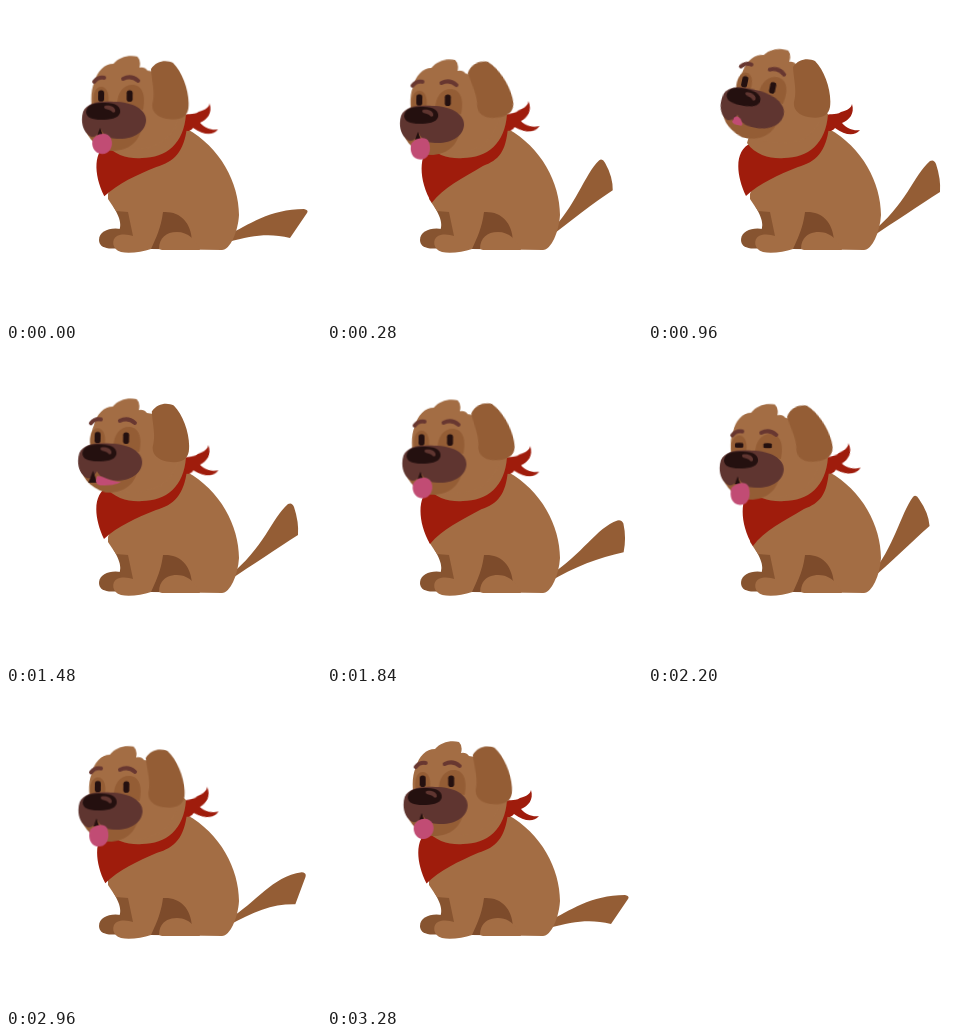
An HTML page that plays this animation: 315 by 315 pixels, repeating every 3.32 s.

```html
<!DOCTYPE html>
<html lang="en">
<head>
<meta charset="utf-8">
<title>Sitting dog</title>
<style>
html, body { margin: 0; width: 100%; height: 100%; overflow: hidden; background: #fff; }
svg { display: block; width: 100vw; height: 100vh; }

.coat { fill: #a36d44; }
.dark { fill: #945d35; }
.far { fill: #875430; }
.shade { fill: #7d4b2b; }
.red { fill: #9f1c0c; }
.ink { fill: #24100f; }
.muzzle { fill: #5f3530; }
.pink { fill: #c14c74; }
.brow { fill: none; stroke: #683730; stroke-width: 4; stroke-linecap: round; }

/* Wagging and panting share one beat of 455 ms, paused while the dog looks up.
   The head leads the tail; scarf and ear trail behind it. */
:root { --lead: -45ms; --trail: -3288ms; }
.move { animation: 3320ms cubic-bezier(.37, 0, .63, 1) infinite; }
#tail { animation-name: wag; }
#skull { animation-name: skull; animation-delay: var(--lead); transform-origin: 140px 130px; }
#ear { animation-name: nod, flap; animation-delay: var(--lead), var(--trail); transform-origin: 152px 62px; }
#face { animation-name: face; animation-delay: var(--lead); transform-origin: 102.5px 98px; }
#tongue { animation-name: tongue; animation-delay: var(--lead); }
#mouth { animation-name: mouth; animation-delay: var(--lead); transform-origin: 94px 125px; }
#scarf { animation-name: scarf; animation-delay: var(--trail); }
#knot { animation-name: knot; animation-delay: var(--lead); transform-origin: 180px 117px; }
#brows { animation-name: brows; }
.eye { animation-name: blink; transform-box: fill-box; transform-origin: 50% 60%; }

@keyframes wag {
  0%, 12.7%, 58.9%, 72.6%, 86.3%, 100% {
    d: path("M222 229 C242 219 264 203 298 203 Q303 204 301 207 L284 232 C264 227 247 229 222 236 Z");
    animation-timing-function: cubic-bezier(.12, 0, .39, 0);
  }
  3.4%, 62.3%, 76%, 89.7% {
    d: path("M222 227 C254 207 266 179 295 173 Q300 173 299 178 L291 206 C267 207 249 216 222 233 Z");
    animation-timing-function: cubic-bezier(.61, 1, .88, 1);
  }
  6.85%, 52%, 65.7%, 79.4%, 93.1% {
    d: path("M222 227 C246 198 252 164 264 147 Q267 144 270 149 Q280 163 281 176 C262 193 246 211 222 231 Z");
    animation-timing-function: cubic-bezier(.12, 0, .39, 0);
  }
  10.1%, 55.5%, 69.1%, 82.8%, 96.5% {
    d: path("M222 227 C256 205 270 179 291 172 Q295 171 297 175 Q300 189 297 204 C272 209 248 218 222 233 Z");
    animation-timing-function: cubic-bezier(.61, 1, .88, 1);
  }
  15.66% { d: path("M222 226 C254 199 266 164 286 158 Q290 157 291 162 L289 192 C268 200 249 211 222 233 Z"); }
  22%, 46% { d: path("M222 228 C259 198 265 170 282 155 Q286 153 288 158 Q293 173 292 186 C270 200 248 215 222 232 Z"); }
}
@keyframes skull {
  0%, 13.7%, 58.9%, 72.6%, 86.3%, 100% { transform: translate(0, -1px); }
  6.85%, 52%, 65.7%, 79.4%, 93.1% { transform: translate(-1.3px, 5px) rotate(-3.7deg); }
  17% { transform: translate(0, -1.5px); }
  26%, 33% { transform: translate(0, -6px) rotate(6deg); }
  43.5%, 46% { transform: translate(0, -1px) rotate(-1deg); }
}
@keyframes nod {
  0%, 13.7%, 46%, 58.9%, 72.6%, 86.3%, 100% { translate: .8px -.5px; }
  6.85%, 52%, 65.7%, 79.4%, 93.1% { translate: -8px 4px; }
  26%, 33% { translate: 0 -2px; }
}
@keyframes flap {
  0%, 13.7%, 46%, 58.9%, 72.6%, 86.3%, 100% { rotate: 0deg; }
  6.85%, 52%, 65.7%, 79.4%, 93.1% { rotate: -14deg; }
}
@keyframes face {
  0%, 13.7%, 58.9%, 72.6%, 86.3%, 100% { transform: translate(.7px, -1px); }
  6.85%, 52%, 65.7%, 79.4%, 93.1% { transform: translate(-5px, 7px) rotate(1deg); }
  17% { transform: translate(.5px, -1.5px); }
  26%, 33% { transform: translate(0, -13px) rotate(12deg); }
  43.5%, 46% { transform: translate(-3.5px, -1.5px) rotate(1deg); }
}
@keyframes tongue {
  0%, 13.7%, 58.9%, 72.6%, 86.3%, 100% { d: path("M90 130 C96 126 103 128 105 133 C108 140 103 148 96 148 C88 148 84 139 87 133 Z"); }
  6.85%, 52%, 65.7%, 79.4%, 93.1% { d: path("M90 132 C97 127 104 128 105 132 C108 141 106 151 97 151 C89 151 86 143 88 134 Z"); }
  17% { d: path("M93 127 C97 126 101 129 103 134 C107 142 102 148 95 148 C87 148 84 140 88 134 Z"); }
  25%, 33% { d: path("M92 127 C95 124 99 127 101 131 C102 134 101 134 98 134 C95 134 91 134 91 131 Z"); }
  43.5%, 47% { d: path("M95 129 C99 127 108 134 119 134 C115 137 107 138 100 138 C96 138 94 136 94 133 Z"); }
}
@keyframes mouth {
  0%, 17%, 52%, 100% { transform: none; }
  25%, 33% { transform: translate(-1px, 2px) scale(.7); }
  43.5%, 47% { transform: translate(-3px, 3px) scale(1.5); }
}
@keyframes scarf {
  0%, 13.7%, 46%, 58.9%, 72.6%, 86.3%, 100% { d: path("M103 137 C87 144 87 167 98 190 C112 177 130 169 150 161 C168 156 178 146 181 121 L174 106 Z"); }
  6.85%, 52%, 65.7%, 79.4%, 93.1% { d: path("M104 140 C92 147 91 174 105 197 C116 182 136 172 156 160 C172 154 179 146 181 121 L174 106 Z"); }
}
@keyframes knot {
  0%, 13.7%, 26%, 33%, 58.9%, 72.6%, 86.3%, 100% { transform: none; }
  17%, 46% { transform: rotate(-5deg); }
  6.85%, 52%, 65.7%, 79.4%, 93.1% { transform: rotate(-12deg); }
}
@keyframes brows {
  0%, 62%, 72%, 100% { transform: none; }
  65%, 68% { transform: translate(0, 5px); }
}
@keyframes blink {
  0%, 62%, 72%, 100% { transform: none; }
  65%, 68% { transform: scale(1.4, .45); }
}
</style>
</head>
<body>
<svg viewBox="0 0 315 315">
  <path id="tail" class="dark move" d="M222 229 C242 219 264 203 298 203 Q303 204 301 207 L284 232 C264 227 247 229 222 236 Z"/>

  <g id="body">
    <path class="far" d="M107 200 L124 204 L130 232 L108 234 C117 222 116 215 107 200 Z"/>
    <path class="far" d="M115 223 C104 221 93 225 93 234 C93 241 101 244 112 242 Z"/>
    <path class="coat" d="M102 188 C112 160 150 122 181 123 C214 141 233 177 233 209 C232 226 224 244 216 244 L145 243 C136 246 123 248 115 246 C106 244 105 233 111 230 C117 227 123 229 127 230 L122 206 L110 205 L102 193 Z"/>
    <path class="shade" d="M157 206 C174 205 185 216 186 235 L154 243 L145 243 C150 232 155 222 157 206 Z"/>
    <path class="coat" d="M153 243 C153 232 160 226 171 226 C182 226 190 234 194 244 L156 244 Z"/>
  </g>

  <path id="scarf" class="red move" d="M103 137 C87 144 87 167 98 190 C112 177 130 169 150 161 C168 156 178 146 181 121 L174 106 Z"/>
  <path id="knot" class="red move" d="M175 111 C181 106 187 110 193 106 C200 104 203 102 204 98 C207 108 201 114 194 117 C199 123 206 125 212 124 C206 131 197 129 187 122 C183 127 178 125 175 122 Z"/>
  <path class="coat" d="M99 137 C108 150 124 153 136 152 C160 152 178 138 180 108 L150 80 L110 100 Z"/>

  <path id="skull" class="coat move" d="M87 108 C85 96 85 84 89 76 C92 65 99 58 108 58 C114 51 124 49 132 51 Q136 55 134 62 Q139 61 142 65 L154 67 L174 112 C165 139 146 145 122 144 C103 144 91 132 87 108 Z"/>
  <path id="ear" class="dark move" d="M145 63 C151 54 161 54 167 57 C177 67 184 88 182 103 C180 113 172 115 160 113 C151 111 145 106 146 98 C149 86 146 78 145 63 Z"/>

  <g id="face" class="move">
    <path class="dark" d="M77 114 C79 130 87 140 104 145 C122 146 134 136 136 120 Z"/>
    <path class="dark" d="M88 99 C86 89 89 81 95 81 C101 81 104 89 102 99 Z M111 99 C111 87 117 79 126 79 C136 79 140 89 137 104 Z"/>
    <g id="brows" class="brow move">
      <path d="M88 76 Q92 71 98 72"/>
      <path d="M117 73 Q125 69 132 75"/>
    </g>
    <rect class="eye ink move" x="92" y="84.5" width="6" height="11.5" rx="2.8"/>
    <rect class="eye ink move" x="120.5" y="84.5" width="6" height="11.5" rx="2.8"/>
    <path class="muzzle" d="M77 106 C81 97 93 95 108 96 C127 96 140 104 140 114 C140 126 127 134 111 133 C104 133 98 130 95 124 C92 129 89 132 85 131 C77 127 74 116 77 106 Z"/>
    <path id="mouth" class="ink move" d="M94 122 L97 130 L91 130 Z"/>
    <path id="tongue" class="pink move" d="M90 130 C96 126 103 128 105 133 C108 140 103 148 96 148 C88 148 84 139 87 133 Z"/>
    <path class="ink" d="M80 106 C81 98 89 97 99 97 C110 97 115 101 114 107 C112 113 104 114 95 114 C86 114 80 112 80 106 Z"/>
    <path class="muzzle" d="M99 100 C105 99 110 102 109 106 Q107 108 105 105 Q103 104 99 103 Q97 101 99 100 Z"/>
  </g>
</svg>
</body>
</html>
```
